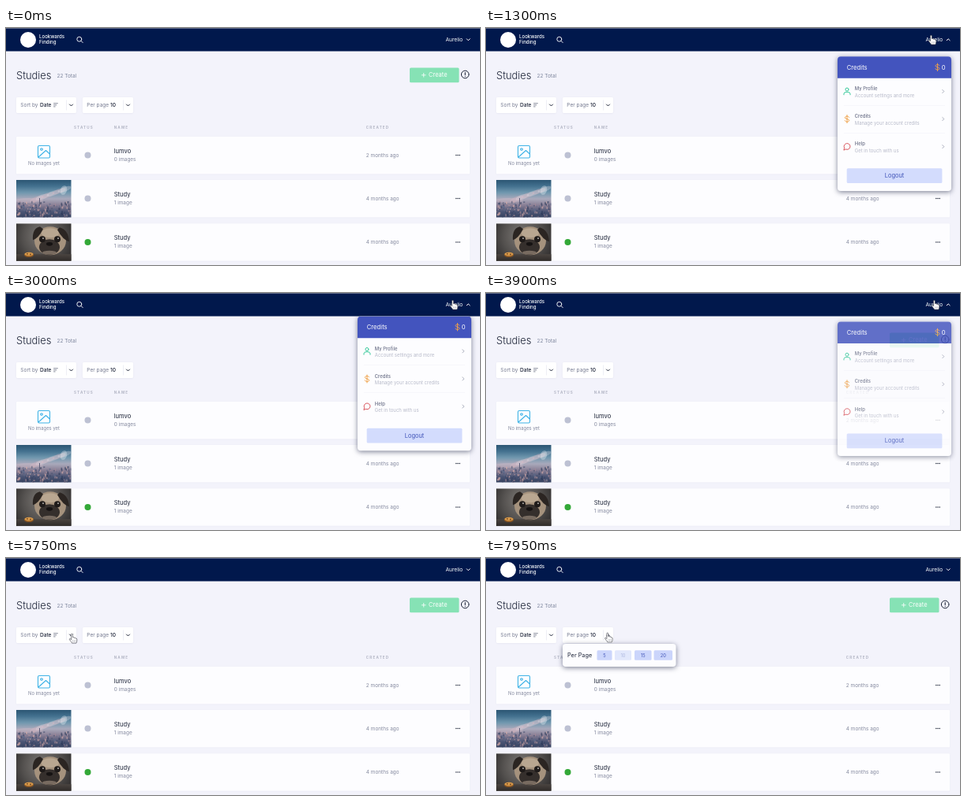
An HTML page with a canvas for the animation above (8 s loop, 600x301 px).

```html
<!DOCTYPE html>
<html lang="en">
<head>
<meta charset="utf-8">
<title>Studies</title>
<style>
html, body { margin: 0; width: 100%; height: 100%; overflow: hidden; background: #f3f3fb; }
canvas { display: block; width: 600px; height: 301px; }
</style>
</head>
<body>
<canvas id="stage"></canvas>
<script>
const W = 600, H = 301, LOOP = 8000;
const scale = window.devicePixelRatio || 1;
const INK = '#1d2438', GREY = '#858a9f', BLUE = '#4155b8';

function setup(canvas) {
  canvas.width = Math.round(W * scale);
  canvas.height = Math.round(H * scale);
  const c = canvas.getContext('2d');
  c.scale(scale, scale);
  return c;
}
const stage = setup(document.getElementById('stage'));
const page = setup(document.createElement('canvas'));
const layer = setup(document.createElement('canvas'));
let g = page;

// Drawing helpers
function text(str, x, y, size, color, weight = 400, align = 'left', spacing = 0) {
  g.font = `${weight} ${size}px Inter, sans-serif`;
  g.letterSpacing = spacing + 'px';
  g.textAlign = align;
  g.textBaseline = 'alphabetic';
  g.fillStyle = color;
  g.fillText(str, x, y + size * 0.36);
}
function box(x, y, w, h, color, r = 0) {
  g.fillStyle = color;
  g.beginPath();
  g.roundRect(x, y, w, h, r);
  g.fill();
}
function disc(x, y, r, color, ry = r, tilt = 0) {
  g.fillStyle = color;
  g.beginPath();
  g.ellipse(x, y, r, ry, tilt, 0, 7);
  g.fill();
}
function line(d, color, width = 1, x = 0, y = 0) {
  g.save();
  g.translate(x, y);
  g.strokeStyle = color;
  g.lineWidth = width;
  g.lineCap = g.lineJoin = 'round';
  g.stroke(new Path2D(d));
  g.restore();
}
function shape(d, color) {
  g.fillStyle = color;
  g.fill(new Path2D(d));
}
function shadow(color, blur, dy) {
  g.shadowColor = color;
  g.shadowBlur = blur * scale;
  g.shadowOffsetY = dy * scale;
}
const noShadow = () => shadow('transparent', 0, 0);
function blend(gradient, colors) {
  colors.forEach((color, i) => gradient.addColorStop(i / (colors.length - 1), color));
  return gradient;
}
function chevron(x, y, color, up = false) {
  line(up ? 'M-2 1L0 -1L2 1' : 'M-2 -1L0 1L2 -1', color, 1, x, y);
}
function dollar(x, y, s, color) {
  g.save();
  g.translate(x, y);
  g.scale(s, s);
  line('M0 -5V5M2.6 -2.2C2.2 -4 -2.6 -4 -2.6 -1.7C-2.6 .6 2.7 -.6 2.7 1.8C2.7 4 -2.4 4 -2.8 2', color, 1);
  g.restore();
}
function clip(x, y, w, h, draw) {
  g.save();
  g.beginPath();
  g.rect(x, y, w, h);
  g.clip();
  g.translate(x, y);
  draw();
  g.restore();
}

function city() {
  box(0, 0, 70, 48, blend(g.createLinearGradient(0, 0, 0, 48),
    ['#2c5673', '#43718f', '#6f97ae', '#a9a9bb', '#8a7f95', '#4c5574', '#35415f']));
  g.globalAlpha = 0.3;
  for (let i = 0; i < 6; i++) {
    disc(26 + i * 7, 24 - i * 2.4, 9, i % 2 ? '#eee4ec' : '#e3b7c0', 3, -0.35);
  }
  disc(16, 26, 18, '#dfc3cc', 3);
  disc(60, 13, 4, '#fff', 6, 0.3);
  g.globalAlpha = 0.65;
  let seed = 7;
  const rnd = () => (seed = (seed * 16807) % 2147483647) / 2147483647;
  const tones = ['#3a4565', '#a98a97', '#d9aeaa', '#5d6a8a', '#2d3a5a'];
  for (let i = 0; i < 150; i++) {
    const h = 1 + rnd() * 2.5;
    box(rnd() * 70, 28 + rnd() * 20 - h / 2, 0.8 + rnd() * 1.4, h, tones[i % 5]);
  }
  g.globalAlpha = 1;
  box(29, 23, 1, 10, '#5c5f7b');
}

function pug() {
  box(0, 0, 70, 48, blend(g.createRadialGradient(32, 14, 4, 34, 18, 44), ['#777370', '#555250', '#2c2a2a']));
  box(0, 39, 70, 9, blend(g.createLinearGradient(0, 39, 0, 48), ['#4a4440', '#2e2a28']));
  disc(43, 22, 20, '#a5927d', 18);
  disc(43, 12, 11, '#b9a791', 6);
  shape('M30 4Q20 6 21 21Q28 19 34 7ZM55 5Q66 8 67 23Q59 21 52 8Z', '#2b2522');
  disc(42, 30, 13, '#352f2c', 10);
  disc(33, 20, 4, '#1f1b1a');
  disc(52, 20, 4, '#1f1b1a');
  disc(34, 18.8, 0.9, '#d7d2cc');
  disc(53, 18.8, 0.9, '#d7d2cc');
  disc(42, 26, 4, '#151212', 2.4);
  disc(42, 37, 9, '#786b60', 2.5);
  disc(16, 39.8, 6, '#8c5722', 3);
  disc(16, 38.8, 5.5, '#d89a4b', 2.4);
  disc(14, 38.5, 0.9, '#69401e');
  disc(18, 39.2, 0.9, '#69401e');
}

function filter(x, w, label, value, valueX) {
  shadow('rgba(60,70,120,.08)', 2, 0.5);
  box(x, 88, w, 20, '#fff', 1.5);
  noShadow();
  text(label, x + 5.3, 98, 6.55, '#777c92');
  text(value, valueX, 98, 6.55, INK, 500);
  box(x + w - 13, 91.5, 0.6, 13, '#e3e4ee');
}

function row(y, name, count, date, dot) {
  shadow('rgba(60,70,120,.05)', 2, 0.5);
  box(13, y, 574, 47.5, '#fdfdff', 1);
  noShadow();
  disc(103.5, y + 23.6, 4, dot);
  text(name, 136.7, y + 18, 7.6, INK);
  text(count, 136.7, y + 28.5, 6.45, GREY);
  text(date, 455.8, y + 23.5, 6.45, GREY);
  for (let i = -1; i < 2; i++) disc(572 + i * 2.2, y + 23.6, 0.75, INK);
}

function drawPage() {
  box(0, 0, W, H, '#f3f3fb');
  box(0, 0, W, 29.5, '#01184c');
  box(0, 0, W, 1, '#5f6a87');
  disc(28, 15, 10, '#fff');
  text('Lookwards', 42, 11.2, 6.1, '#fff', 500);
  text('Finding', 42, 18.2, 6.1, '#fff', 500);
  line('M95.8 14.2A3 3 0 1 1 89.8 14.2A3 3 0 1 1 95.8 14.2M95.1 16.5L97.2 18.6', '#fff', 0.9);
  text('Aurelio', 556.5, 14.6, 6.6, '#fff');

  text('Studies', 13, 60.5, 12.9, INK, 300);
  text('22 Total', 64.5, 60.8, 6.5, '#7c849c');
  box(511, 50.5, 62.5, 18.8, '#86e2b5', 1.5);
  line('M526.3 59.8H531.1M528.7 57.4V62.2', '#fff', 0.8);
  text('Create', 535, 59.7, 7.5, '#fff');
  line('M586 59A4.8 4.8 0 1 1 576.4 59A4.8 4.8 0 1 1 586 59', INK, 1);
  line('M581.2 56.5V59.4M581.2 61.4V61.5', INK, 1.1);

  filter(13, 76, 'Sort by', 'Date', 43);
  filter(97, 64, 'Per page', '10', 132);
  line('M60.5 95.7H65.4M60.5 97.8H63.8M60.5 99.9H62.2', '#555b72', 0.7);
  chevron(82.5, 98, INK);

  const head = (s, x) => text(s, x, 126.7, 4.6, '#b4b7c6', 700, 'left', 1.15);
  head('STATUS', 86);
  head('NAME', 136.7);
  head('CREATED', 455.8);

  row(138, 'lumvo', '0 images', '2 months ago', '#bdc1d3');
  row(193, 'Study', '1 image', '4 months ago', '#bdc1d3');
  row(248.3, 'Study', '1 image', '4 months ago', '#33a838');
  line('M42 149.5H54A1.5 1.5 0 0 1 55.5 151V163.5A1.5 1.5 0 0 1 54 165H42A1.5 1.5 0 0 1 40.5 163.5V151A1.5 1.5 0 0 1 42 149.5Z'
    + 'M41 164L50.5 155.5L55.3 160M46.3 154A1.3 1.3 0 1 1 43.7 154A1.3 1.3 0 1 1 46.3 154', '#3fb3e6', 1.1);
  text('No images yet', 48, 172, 5.9, GREY, 400, 'center');
  clip(13, 193, 69.5, 47.5, city);
  clip(13, 248.3, 69.5, 47.5, pug);
}

// Popups
function panel(x, y, w, h) {
  shadow('rgba(20,28,60,.55)', 6, 1.5);
  box(x, y, w, h, '#fdfdff', 4);
  noShadow();
}

function accountMenu(top) {
  g.save();
  g.translate(0, top);
  panel(445, 0, 144, 170.6);
  box(445, 0, 144, 27.5, '#4354be', [4, 4, 0, 0]);
  text('Credits', 456.7, 13.8, 7.7, '#fff');
  dollar(571.5, 13.5, 0.95, '#f0a24a');
  text('0', 576.8, 13.6, 7.7, '#fff');
  [['My Profile', 'Account settings and more'],
   ['Credits', 'Manage your account credits'],
   ['Help', 'Get in touch with us']].forEach(([title, note], i) => {
    const y = 44.2 + i * 35.1;
    text(title, 466.8, y - 3.4, 5.9, '#6b7087', 500);
    text(note, 466.8, y + 5.2, 5.95, '#b7bac9');
    line('M-1 -2L1 0L-1 2', '#9498ab', 0.8, 578.8, y);
    if (i < 2) box(453, y + 17.5, 128, 0.5, '#f1f1f7');
  });
  line('M-4 4.3V3A2.8 2.8 0 0 1 -1.2 .9H1.2A2.8 2.8 0 0 1 4 3V4.3M2 -2.4A2 2 0 1 1 -2 -2.4A2 2 0 1 1 2 -2.4', '#35c99a', 1, 457, 44.2);
  dollar(457, 79.3, 1, '#f0a24a');
  line('M-4 4.2L-3.4 1.7A3.9 3.9 0 1 1 -1.5 3.5Z', '#d9535b', 1, 457, 114.3);
  box(456.7, 142, 120.7, 18.8, '#d3dcfd', 1.5);
  text('Logout', 517, 151.3, 7.4, BLUE, 400, 'center');
  g.restore();
}

function pageMenu(top) {
  g.save();
  g.translate(0, top);
  panel(97, 0, 143.5, 29);
  text('Per Page', 103, 14.4, 7.3, INK);
  [[5, 140.5, 19], [10, 163, 21], [15, 188, 21.5], [20, 212.5, 23.5]].forEach(([n, x, w]) => {
    const off = n === 10;
    box(x, 8.2, w, 12.4, off ? '#e2e8fc' : '#cbd5fb', 1.5);
    text(n, x + w / 2, 14.4, 5.7, off ? '#adb7df' : BLUE, 400, 'center');
  });
  g.restore();
}

// Motion
const clamp = v => Math.min(1, Math.max(0, v));
const RISE = 14;

function popup(t, start, end, rest, draw) {
  if (t < start || t >= end + 720) return;
  const age = t - start, out = clamp((t - end) / 720);
  const shift = RISE * (Math.exp(-age / 470) + out ** 1.2);
  g = layer;
  g.clearRect(0, 0, W, H);
  draw(rest + shift);
  g = stage;
  g.globalAlpha = clamp(age / 300) * (1 - out ** 3);
  g.drawImage(layer.canvas, 0, 0, W, H);
  g.globalAlpha = 1;
}

const PATH = [[0, 606, 11.2], [300, 606, 11.2], [850, 563.4, 9.2], [2000, 563.4, 9.2], [3000, 565.4, 9.2],
  [3900, 567.4, 9.2], [4250, 568.4, 9.7], [5150, 484, 94.2], [5700, 83.4, 96.3], [6200, 83.4, 96.3],
  [6800, 153.7, 95.1], [LOOP, 153.7, 95.1]];

function pointer(t) {
  const i = PATH.findIndex(k => k[0] > t);
  const [t0, x0, y0] = PATH[i - 1], [t1, x1, y1] = PATH[i];
  const p = (t - t0) / (t1 - t0), e = p * p * (3 - 2 * p);
  return [x0 + (x1 - x0) * e, y0 + (y1 - y0) * e];
}

const HAND = 'M-1 1Q-1 0 0 0Q1 0 1 1V4.6Q1.4 4 2.3 4.3Q2.9 4.5 3 5.1Q3.8 4.7 4.5 5.1Q4.9 5.4 4.9 5.9'
  + 'Q6.4 5.6 6.4 7V8.6Q6.4 10 5.6 11.8H.1Q-.3 10.6 -1.8 9Q-3.6 7.1 -3 6.4Q-2.3 5.8 -1 7.2Z';

function hand(x, y) {
  g.save();
  g.translate(x, y);
  shape(HAND, '#fff');
  line(HAND, '#33343f', 0.6);
  line('M1.2 8.4V10M2.9 8.4V10M4.5 8.4V10', '#6d6f7c', 0.4);
  g.restore();
}

function frame(now) {
  const t = now % LOOP;
  g = stage;
  g.drawImage(page.canvas, 0, 0, W, H);
  chevron(585.2, 14.8, '#fff', t >= 960 && t < 4150);
  chevron(154.5, 98, INK, t >= 6900);
  popup(t, 960, 3500, 29.5, accountMenu);
  popup(t, 6900, LOOP, 107.6, pageMenu);
  hand(...pointer(t));
}

drawPage();
const began = performance.now();
function tick() {
  frame(performance.now() - began);
  requestAnimationFrame(tick);
}
tick();
</script>
</body>
</html>
```
